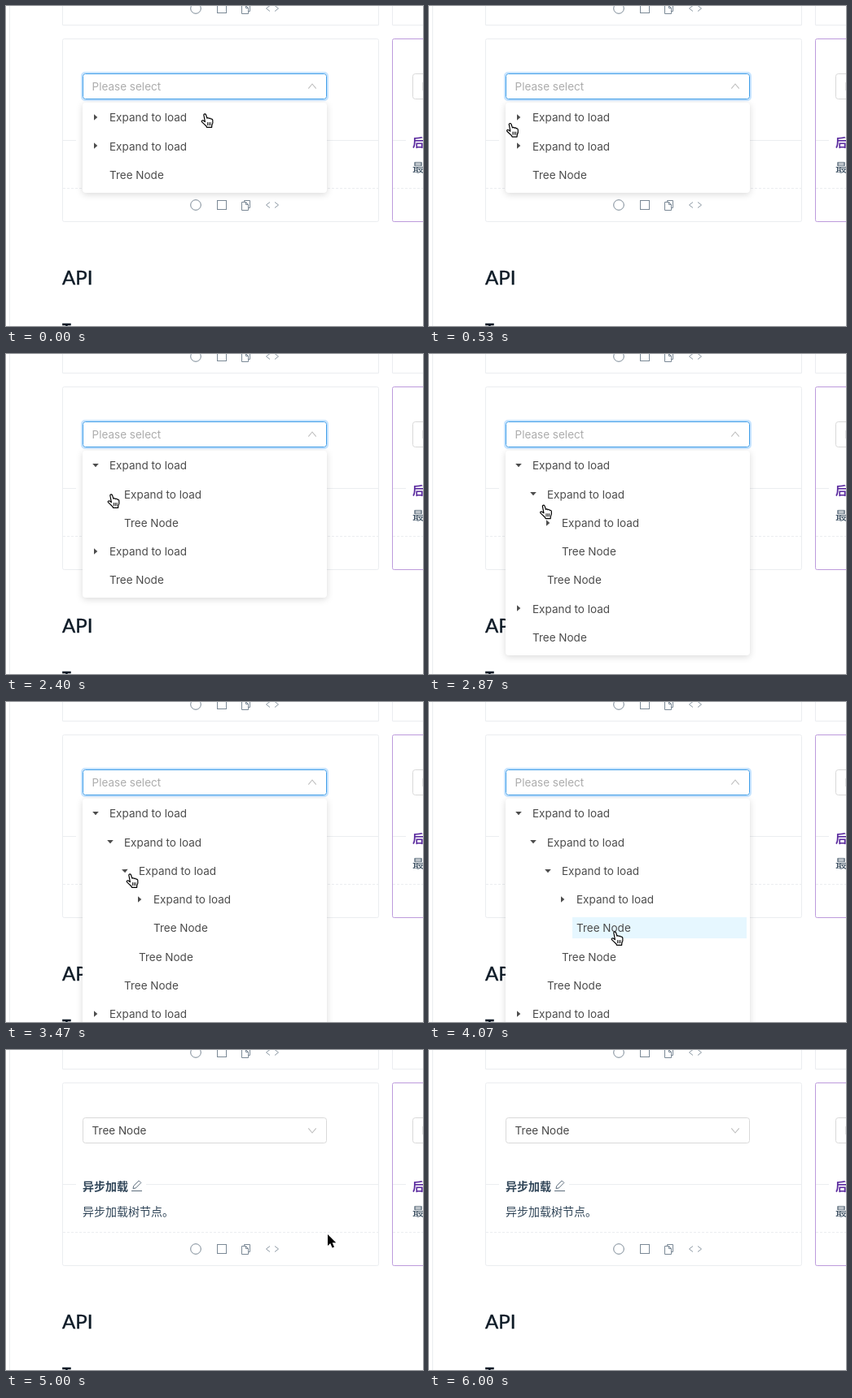
An HTML page for the animation above (6.14 s loop, 512x394 px).

```html
<!DOCTYPE html>
<html lang="zh">
<head>
<meta charset="utf-8">
<title>Tree select</title>
<style>
html, body { margin: 0; width: 100%; height: 100%; overflow: hidden; background: #fff; }
#stage { position: relative; width: 100%; height: 100%; overflow: hidden; contain: strict; }
svg { display: block; overflow: hidden; }
#page, #pointer { position: absolute; left: 0; top: 0; width: 100%; height: 100%; }
.ui { font: 13.5px Inter, sans-serif; }
.zh { font: 14px "Noto Sans CJK SC", "Noto Sans CJK", sans-serif; fill: #314659; }
.head { font: 24px Lato, sans-serif; fill: #0d1a26; stroke: #0d1a26; stroke-width: .4; }
.line { fill: none; stroke: #ebedf0; }
.icon { fill: none; stroke: #7b8996; }
#drop {
  position: absolute; left: 94px; top: 119px; width: 300px; padding: .35px 0 4.3px; box-sizing: border-box;
  background: #fff; border-radius: 4px; box-shadow: 0 2px 8px rgba(0,0,0,.15);
  transform-origin: 0 0; color: #4c4c4c;
}
.row { display: flex; align-items: center; height: 35.3px; }
.row svg { width: 8px; height: 8px; margin: 0 8px 0 12px; fill: #4c4c4c; }
.title { flex: 1; margin-right: 4px; padding: 1.6px 0 0 5px; line-height: 25px; white-space: nowrap; }
.kids { margin-left: 18px; overflow: hidden; }
</style>
</head>
<body>
<div id="stage">
<svg id="page">
  <defs>
    <g id="tools" class="icon">
      <circle cx="233" r="6.3"/>
      <rect x="259.5" y="-5.5" width="11" height="11"/>
      <path d="M292.5 -3.5V-5.5H299.5V3.5H297.5M289.5 -3.5H294.5L297.5 -.5V6.5H289.5ZM294.5 -3.5V-.5H297.5"/>
      <path d="M324 -3.5L319.5 0L324 3.5M330 -3.5L334.5 0L330 3.5" stroke="#8f9ba6"/>
    </g>
  </defs>
  <path class="line" d="M4.5 0V394M69.5 0V23.5H457.5V0M474.5 0V23.5H512"/>
  <rect class="line" x="69.5" y="40.5" width="388" height="225" rx="2"/>
  <path class="line" d="M70 165.5H86M172 165.5H457M475 165.5H491"/>
  <path class="line" d="M70 224.5H457M475 224.5H512" stroke-dasharray="3 2"/>
  <path d="M512 40.5H476.5Q474.5 40.5 474.5 42.5V263.5Q474.5 265.5 476.5 265.5H512" fill="none" stroke="#bd9bdc"/>
  <use href="#tools" y="3"/>
  <use href="#tools" y="245"/>

  <path d="M512 83.5H502.5Q499.5 83.5 499.5 86.5V111.5Q499.5 114.5 502.5 114.5H512" fill="none" stroke="#d9d9d9"/>
  <text class="ui" x="510.5" y="104" fill="#adadad">Please select</text>
  <text class="zh" x="499" y="172.5" style="font-weight:700;fill:#5a2a9e">后缀图标</text>
  <text class="zh" x="499" y="203.5">最简单的用法。</text>

  <text class="zh" x="94" y="172.5" style="font-weight:700">异步加载</text>
  <path class="icon" d="M154 173.5H167M156 170.5L156.7 167.4L163.2 160.9L165.8 163.5L159.3 170Z" style="stroke:#5d6d7c"/>
  <text class="zh" x="94" y="203.5">异步加载树节点。</text>

  <rect id="glow" x="93" y="82" width="302" height="34" rx="4" fill="none" stroke="#1890ff" stroke-opacity=".24" stroke-width="2"/>
  <rect id="box" x="94.5" y="83.5" width="299" height="31" rx="3" fill="#fff"/>
  <text id="value" class="ui" x="105.6" y="104"></text>
  <path id="chevron" d="M371.3 96.3L376 102L380.7 96.3" fill="none" stroke="#bfbfbf" stroke-width="1.1"/>

  <text class="head" x="69" y="343">API</text>
  <text class="head" x="69" y="404.5" style="font-size:18px;font-weight:700">Tree props</text>
</svg>

<div id="drop" class="ui"></div>

<svg id="pointer">
  <g id="hand" stroke="#000" stroke-linejoin="round" stroke-linecap="round">
    <path fill="#fff" stroke-width="1.2" d="M3.8 2C4 .5 6 .5 6.5 1.9L8 6.2C8.6 5.4 10 5.6 10.3 6.6C11 5.9 12.3 6.2 12.6 7.2C13.6 6.8 14.6 7.4 14.8 8.6C15.2 11 15 13 13.8 15L13.6 17.4H7.6L7 16C5 14 3.4 12.4 1.4 10.6C.6 9.4 2 8.3 3.2 9.1L5.4 10.6Z"/>
    <path fill="none" stroke-width=".9" d="M8.4 11.5V14.7M10.3 11.5V14.7M12.2 11.5V14.7"/>
  </g>
  <path id="arrow" d="M0 0V14L3.2 11L5.6 16.6L8 15.6L5.6 10.3H10.2Z" stroke="#fff" paint-order="stroke" stroke-width="2"/>
</svg>
</div>

<script>
const LOOP = 6140, ROWS = 70.6;
const OPEN = [970, 2405, 3330];          // moments at which each level unfolds
const PICK = 4200, CLOSE = 4268, GONE = 5730;
const EASE = [.25, .1, .25, 1], IN_OUT = [.645, .045, .355, 1], IN_QUINT = [.755, .05, .855, .06];
const WHITE = [255, 255, 255], HOVER = [230, 247, 255], SELECTED = [186, 231, 255];
const FOCUS = [64, 158, 232], IDLE = [217, 217, 217];

// time, left, top of the hand
const PATH = [
  [0, 239, 132], [50, 239, 132], [420, 79, 147], [600, 102, 142], [800, 102, 141],
  [1480, 102, 141], [1930, 128, 181], [2020, 128, 181], [2330, 124, 172], [2400, 124, 172],
  [2600, 133, 179], [2690, 133, 179], [3330, 146, 211], [3470, 147, 211], [4000, 223, 282],
  [4670, 223, 282], [5000, 389, 226], [5470, 389, 226], [5730, 393, 212], [LOOP, 393, 212]
];

const $ = id => document.getElementById(id);
const clamp = v => Math.min(1, Math.max(0, v));
const span = (t, from, length) => clamp((t - from) / length);
const mix = (a, b, p) => `rgb(${a.map((v, i) => v + (b[i] - v) * p)})`;

function bezier(x, [x1, y1, x2, y2]) {
  if (x <= 0 || x >= 1) return clamp(x);
  const at = (s, a, b) => 3 * s * (1 - s) ** 2 * a + 3 * s * s * (1 - s) * b + s ** 3;
  let lo = 0, hi = 1;
  for (let i = 0; i < 24; i++) {
    const mid = (lo + hi) / 2;
    if (at(mid, x1, x2) < x) lo = mid; else hi = mid;
  }
  return at(lo, y1, y2);
}

const row = (label, caret) => `<div class="row"><svg viewBox="-4 -4 8 8">${
  caret ? '<path d="M-3.8 -2H3.8L0 2.3Z" transform="rotate(-90)"/>' : ''
}</svg><span class="title">${label}</span></div>`;
const branch = depth => row('Expand to load', true) +
  (depth < OPEN.length ? `<div class="kids">${branch(depth + 1)}${row('Tree Node')}</div>` : '');

const drop = $('drop');
drop.innerHTML = branch(0) + row('Expand to load', true) + row('Tree Node');
const carets = drop.querySelectorAll('path');
const kids = drop.querySelectorAll('.kids');
const first = drop.querySelector('.title');
const chosen = kids[2].lastElementChild.querySelector('.title');

function drawTree(t) {
  OPEN.forEach((start, i) => {
    const p = bezier(span(t, start, 140), IN_OUT);
    kids[i].style.height = p < 1 ? ROWS * p + 'px' : 'auto';
    kids[i].style.opacity = p;
    const turn = bezier(span(t, start, 200), EASE);
    carets[i].setAttribute('transform', `rotate(${-90 + 90 * turn})`);
  });
  carets[1].style.opacity = t > 2150 && t < OPEN[1] ? 0 : 1;   // loading

  const graze = Math.min(span(t, 0, 300), 1 - span(t, 230, 250));
  first.style.background = mix(WHITE, HOVER, graze);
  chosen.style.background = t < PICK
    ? mix(WHITE, HOVER, span(t, 3750, 250))
    : mix(HOVER, SELECTED, span(t, PICK, 180));

  const shut = bezier(span(t, CLOSE, 200), IN_QUINT);
  drop.style.display = shut < 1 ? 'block' : 'none';
  drop.style.opacity = 1 - shut;
  drop.style.transform = `scaleY(${1 - .2 * shut})`;
}

function drawSelect(t) {
  const picked = t >= PICK, back = bezier(span(t, CLOSE, 300), EASE);
  $('value').textContent = picked ? 'Tree Node' : 'Please select';
  $('value').setAttribute('fill', picked ? '#484848' : '#adadad');
  $('glow').style.opacity = 1 - back;
  $('box').setAttribute('stroke', mix(FOCUS, IDLE, span(t, 4400, 200)));
  $('chevron').setAttribute('transform', `rotate(${180 * (1 - back)} 376 99)`);
}

function drawPointer(t) {
  const i = PATH.findIndex(k => k[0] > t);
  const [t0, x0, y0] = PATH[i - 1], [t1, x1, y1] = PATH[i];
  const u = span(t, t0, t1 - t0), p = u * u * (3 - 2 * u);
  const x = x0 + (x1 - x0) * p, y = y0 + (y1 - y0) * p;
  $('hand').setAttribute('transform', `translate(${x} ${y})`);
  $('arrow').setAttribute('transform', `translate(${x + 6} ${y + 1})`);
  $('hand').style.display = t < CLOSE ? '' : 'none';
  $('arrow').style.display = t >= CLOSE && t < GONE ? '' : 'none';
}

const began = performance.now();
function frame() {
  const t = (performance.now() - began) % LOOP;
  drawTree(t);
  drawSelect(t);
  drawPointer(t);
  requestAnimationFrame(frame);
}
frame();
</script>
</body>
</html>
```
